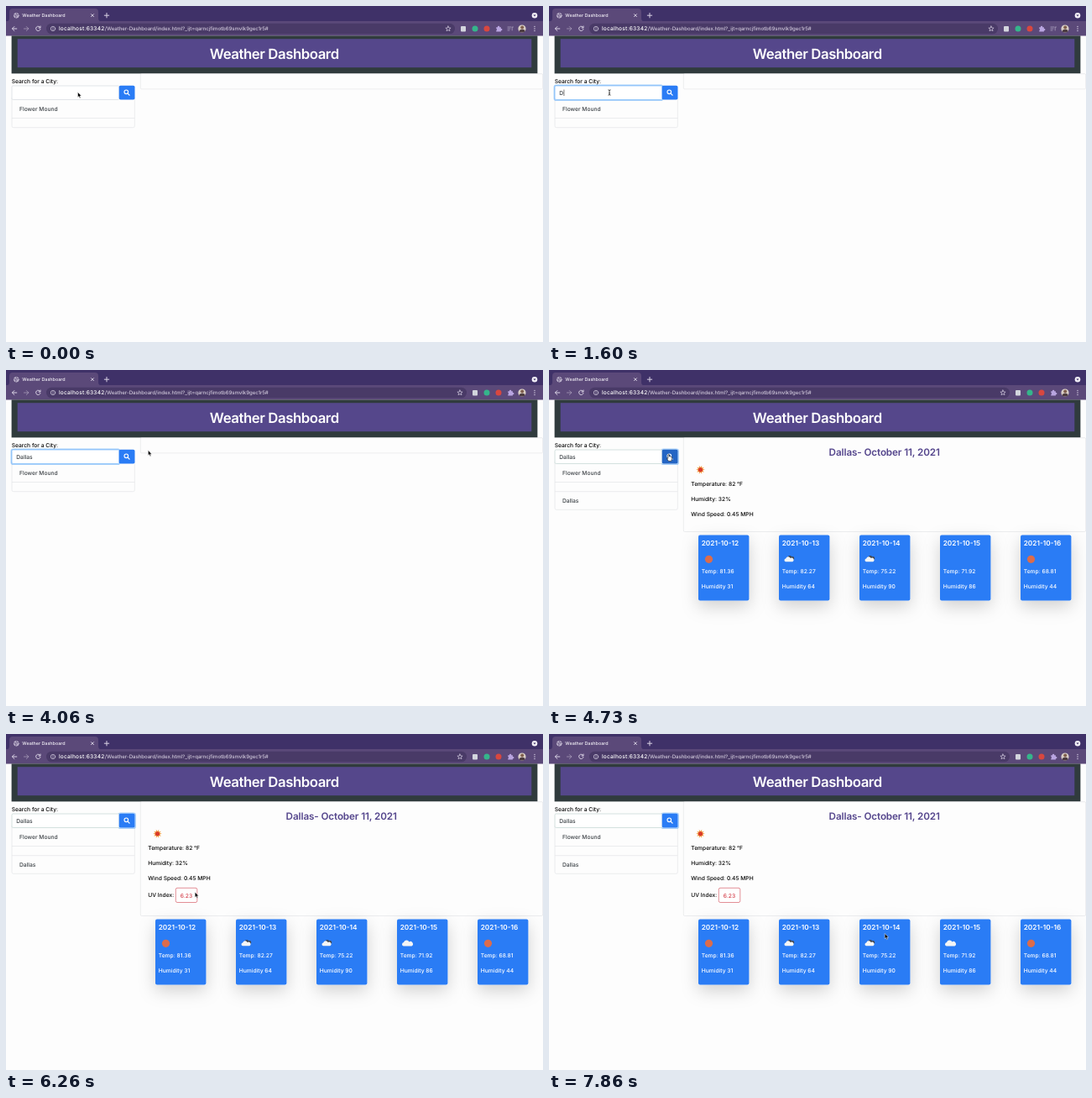
An HTML page for the animation above (8 s loop, 640x400 px).

```html
<!DOCTYPE html>
<html lang="en">
<head>
<meta charset="utf-8">
<title>Weather Dashboard</title>
<style>
  html, body { margin: 0; width: 100%; height: 100%; overflow: hidden; background: #fdfdfd; }
  svg { display: block; width: 100vw; height: 100vh; }
  text { font: 500 6.7px Inter, "Open Sans", sans-serif; fill: #212529; white-space: pre; text-rendering: geometricPrecision; }
  .tab { font-size: 5.4px; fill: #f4f1f8; }
  .host { font-size: 6.6px; letter-spacing: .2px; fill: #fff; }
  .path { font-size: 6.1px; letter-spacing: -.05px; fill: #cfc7da; }
  .title { font-size: 16.8px; font-weight: 600; letter-spacing: -.45px; fill: #fff; text-anchor: middle; }
  .city { font-size: 11.7px; font-weight: 600; letter-spacing: -.12px; fill: #54458c; text-anchor: middle; }
  .black { fill: #050505; }
  .item { fill: #3b4045; }
  .day { font-size: 8.25px; font-weight: 600; fill: #fff; }
  .stat { fill: #fff; }
  .uv { fill: #d43f4a; text-anchor: middle; }
  .edge { fill: none; stroke: #dfe1e4; stroke-width: .6; }
  .line { fill: none; stroke: #d9d2e4; stroke-width: 1; stroke-linecap: round; stroke-linejoin: round; }
  .thin { stroke-width: .7; }
</style>
</head>
<body>
<svg viewBox="0 0 640 400">
  <defs>
    <filter id="shadow" x="-70%" y="-50%" width="240%" height="220%">
      <feDropShadow dx="0" dy="7" stdDeviation="10" flood-color="#000" flood-opacity=".175"/>
    </filter>
    <clipPath id="round"><circle cx="615" cy="27" r="4.6"/></clipPath>
    <path id="cloud" d="M-4.8 3.2a2.3 2.3 0 0 1 .3-4.5a3.5 3.5 0 0 1 6.5-.6a2.7 2.7 0 0 1 3 5.1z"/>
  </defs>
  <rect width="640" height="400" fill="#fdfdfd"/>

  <!-- browser -->
  <rect width="640" height="19" fill="#3f3168"/>
  <path d="M0 18.5q4 0 4-4V7q0-4 4-4H106q4 0 4 4v7.500q0 4 4 4z" fill="#5b4979"/>
  <rect y="18" width="640" height="17.500" fill="#5b4979"/>
  <g class="line thin">
    <circle cx="12.300" cy="11.300" r="2.900" fill="#a99dbb"/>
    <path d="M9.600 10.500l2.500 1l-.5 2.500M12.500 8.600l.4 1.600l2.100 .5" stroke="#5b4979"/>
  </g>
  <text class="tab" x="19.300" y="13.200">Weather Dashboard</text>
  <path class="line" d="M101.500 9.700l3 3m0-3l-3 3M117.300 11.200h5.400M120 8.500v5.400"/>
  <circle cx="630" cy="11.200" r="3.300" fill="#f2eff7"/>
  <path d="M628.400 10.400h3.200l-1.600 2z" fill="#3f3168"/>
  <path class="line" d="M12.800 27H7.400m2.500-2.500L7.400 27l2.500 2.500"/>
  <path class="line" d="M21.400 27h5.400m-2.500-2.500l2.500 2.500l-2.500 2.500" opacity=".45"/>
  <path class="line" d="M40.700 25.500a2.700 2.700 0 1 0 .3 2M41 24v2h-2"/>
  <rect id="pill" x="48" y="20.700" height="12.600" rx="6.300" fill="#493a67"/>
  <circle class="line thin" cx="56" cy="27" r="2.700"/>
  <path class="line thin" d="M56 26.800v1.500M56 25.500v.05"/>
  <text class="host" x="63" y="29.200">localhost:63342</text>
  <text class="path" x="117.700" y="29.200">/Weather-Dashboard/index.html?_ijt=qarncjfimotb69smvlk9gec1r5#</text>
  <g id="tools">
    <path class="line thin" d="M527 24l.9 2l2.200 .2l-1.700 1.400l.6 2.100l-2-1.100l-2 1.100l.6-2.100l-1.700-1.400l2.200-.2z"/>
    <rect x="542" y="24" width="6" height="6.500" rx="1" fill="#d3d5dd"/>
    <circle cx="559" cy="27" r="3.500" fill="#35b58b"/>
    <circle cx="573" cy="27" r="3.500" fill="#d8473f"/>
    <path d="M584.300 25.200h1.700a1.150 1.150 0 1 1 2.200 0h1.700v1.800a1.150 1.150 0 1 1 0 2.200v1.300h-5.600v-1.500a1.100 1.100 0 0 0 0-2.100z" fill="#b9a5e0"/>
  </g>
  <path id="media" class="line" d="M598 25h4M598 27h3M598 29h2M603.200 29v-4h1.300" opacity=".5"/>
  <g clip-path="url(#round)">
    <rect x="610" y="22" width="10" height="10" fill="#d9cfc6"/>
    <circle cx="615.200" cy="25.600" r="2" fill="#80604e"/>
    <ellipse cx="615.200" cy="31" rx="3.600" ry="3.200" fill="#4b3b40"/>
  </g>
  <g fill="#d9d2e4"><circle cx="630" cy="24.500" r=".7"/><circle cx="630" cy="27" r=".7"/><circle cx="630" cy="29.500" r=".7"/></g>

  <!-- heading and search -->
  <rect x="6.600" y="35.400" width="626.800" height="45" fill="#303b3d"/>
  <rect x="13.700" y="39.200" width="612.600" height="34" fill="#55478b"/>
  <text class="title" x="319.800" y="62.600">Weather Dashboard</text>
  <text class="black" x="6.700" y="92">Search for a City:</text>
  <rect id="list" class="edge" x="7" y="108" width="146.300" rx="1.800"/>
  <path class="edge" d="M7 133.500h146.300"/>
  <text class="item" x="16" y="125.300">Flower Mound</text>
  <g id="added">
    <path class="edge" d="M7 144.700h146.300"/>
    <text class="item" x="16" y="158.200">Dallas</text>
  </g>
  <rect id="ring" y="94.300" height="18" rx="2.400" fill="none" stroke="#55a3f7" stroke-opacity=".5" stroke-width="1.500"/>
  <rect id="field" x="7" y="95" width="128" height="16.500" rx="1.500" fill="#fff" stroke-width=".6"/>
  <text id="typed" class="item" x="12.300" y="105.700"></text>
  <rect id="caret" y="99.500" width=".6" height="7.500" fill="#222"/>
  <rect id="button" x="134.700" y="94.800" width="18.800" height="16.800" rx="1.800"/>
  <circle cx="143.300" cy="102.300" r="2.300" fill="none" stroke="#fff" stroke-width="1.100"/>
  <path d="M145.100 104.100l2 2" stroke="#fff" stroke-width="1.300" stroke-linecap="round"/>

  <!-- results -->
  <rect id="panel" class="edge" x="160.300" y="80.700" width="479.400" rx="1.500"/>
  <g id="today">
    <text class="city" x="399.700" y="101.800">Dallas- October 11, 2021</text>
    <path id="rays" fill="#f2973a"/>
    <circle cx="180.500" cy="118.700" r="2.500" fill="#d8382a"/>
    <text class="black" x="169.300" y="138">Temperature: 82 °F</text>
    <text class="black" x="169.300" y="156">Humidity: 32%</text>
    <text class="black" x="169.300" y="173.700">Wind Speed: 0.45 MPH</text>
  </g>
  <g id="index">
    <text class="black" x="169.300" y="193.500">UV Index:</text>
    <rect x="202.300" y="183.300" width="25.500" height="17.200" rx="1.800" fill="#fff" stroke="#d8606a" stroke-width=".7"/>
    <text class="uv" x="215" y="194.500">6.23</text>
  </g>
  <g id="cards"></g>

  <!-- pointers -->
  <path id="arrow" d="M0 0v6.200l1.400-1.200l1 2.200l1.100-.5l-1-2.100h1.900z" fill="#000" stroke="#fff" stroke-width=".5"/>
  <path id="beam" d="M-1.500-3.200q1.500 0 1.500 1q0-1 1.500-1M0-2.500v5M-1.500 3.200q1.500 0 1.500-1q0 1 1.500 1M-.7 .8h1.400" fill="none" stroke="#222" stroke-width=".8"/>
  <path id="hand" d="M-1.600-3.300q.7-.7 1.300 0v2.200q.6-.5 1.200 .1q.7-.4 1.100 .2q.9-.2 1 .7v2q-.2 1.300-.9 2.500h-3.100q-1.200-1.400-2.100-3.300q.2-.9 1.500 .2z" fill="#fff" stroke="#111" stroke-width=".6" stroke-linejoin="round"/>
</svg>
<script>
  const LOOP = 8000, CITY = "Dallas";
  const FOCUS = 920, CLICK = 4450, LOADED = 4590, LATE_ICON = 4850, UV = 4990, MEDIA_END = 2920;
  const KEYS = [1450, 1850, 1990, 2120, 2250, 2450];
  const TRACK = [
    [0, 85.5, 102.5], [600, 72, 103], [2930, 72, 103], [3460, 116, 104],
    [4050, 169.500, 95.500], [4330, 143.500, 104], [5400, 143.500, 104],
    [6130, 225.200, 188.200], [6800, 225.200, 188.200], [7730, 400.200, 237.500]
  ];
  const DAYS = [
    [12, "sun", "81.36", 31], [13, "mixed", "82.27", 64], [14, "mixed", "75.22", 90],
    [15, "cloud", "71.92", 86], [16, "sun", "68.81", 44]
  ];
  const el = id => document.getElementById(id);
  const set = (id, attrs) => { for (const k in attrs) el(id).setAttribute(k, attrs[k]); };
  const show = (id, on) => set(id, { display: on ? "inline" : "none" });

  const cloud = (x, y, scale, fill) =>
    `<use href="#cloud" transform="translate(${x} ${y}) scale(${scale})" fill="${fill}"/>`;
  const icons = {
    sun: x => `<circle cx="${x + 12.5}" cy="225.300" r="4.600" fill="#dc6c4b"/>`,
    mixed: x => cloud(x + 13.700, 223.700, .7, "#3f4651") + cloud(x + 12, 225.500, .85, "#f5f5f5"),
    cloud: x => cloud(x + 12.5, 225.300, 1, "#f5f5f5")
  };

  el("cards").innerHTML = DAYS.map(([day, icon, temp, humidity], i) => {
    const x = 178 + 96 * i;
    return `<rect x="${x}" y="196.400" width="60.400" height="78.200" rx="2" fill="#2a7cf5" filter="url(#shadow)"/>
      <text class="day" x="${x + 3.700}" y="209">2021-10-${day}</text>
      <g id="icon${i}">${icons[icon](x)}</g>
      <text class="stat" x="${x + 3.800}" y="242">Temp: ${temp}</text>
      <text class="stat" x="${x + 3.800}" y="260">Humidity ${humidity}</text>`;
  }).join("");

  const star = Array.from({ length: 20 }, (_, i) => {
    const r = i % 2 ? 2.800 : 5.200, a = i * Math.PI / 10;
    return `${180.5 + r * Math.cos(a)} ${118.700 + r * Math.sin(a)}`;
  });
  set("rays", { d: `M${star.join("L")}z` });

  function pointerAt(t) {
    const i = TRACK.findIndex(p => p[0] > t);
    if (i < 0) return TRACK[TRACK.length - 1].slice(1);
    const [t0, x0, y0] = TRACK[i - 1], [t1, x1, y1] = TRACK[i];
    const u = (t - t0) / (t1 - t0), s = u * u * (3 - 2 * u);
    return [x0 + (x1 - x0) * s, y0 + (y1 - y0) * s];
  }

  function draw(t) {
    const typed = KEYS.filter(k => k <= t);
    const inField = t >= FOCUS && t < CLICK, clicked = t >= CLICK, loaded = t >= LOADED, uv = t >= UV;

    const media = t < MEDIA_END;
    set("pill", { width: media ? 487 : 501 });
    set("tools", { transform: `translate(${media ? 0 : 14} 0)` });
    show("media", media);

    el("typed").textContent = CITY.slice(0, typed.length);
    set("field", { stroke: inField ? "#62adf8" : clicked ? "#b9cfcc" : "#ced4da" });
    show("ring", inField || clicked);
    set("ring", clicked ? { x: 134, width: 20.200 } : { x: 6.300, width: 129.400 });
    const lastKey = typed.length ? typed[typed.length - 1] : FOCUS;
    show("caret", inField && (t - lastKey) % 1000 < 500);
    set("caret", { x: 12.800 + (typed.length ? el("typed").getComputedTextLength() : 0) });

    set("list", { height: loaded ? 58.300 : 36.700 });
    show("added", loaded);
    set("panel", { height: uv ? 135.800 : loaded ? 111.800 : 18.200 });
    show("today", loaded);
    show("index", uv);
    show("cards", loaded);
    set("cards", { transform: `translate(0 ${uv ? 24 : 0})` });
    show("icon3", t >= LATE_ICON);

    const [x, y] = pointerAt(t);
    const inRow = y > 95 && y < 111.500;
    const kind = inRow && x > 134.500 && x < 153.500 ? "hand"
      : inRow && x < 134.500 && t >= 400 ? "beam" : "arrow";
    for (const id of ["arrow", "beam", "hand"]) show(id, id === kind);
    set(kind, { transform: `translate(${x} ${y})` });
    set("button", { fill: kind === "hand" ? "#2465c4" : "#2a7cf5" });
  }

  const start = performance.now();
  function tick() {
    draw((performance.now() - start) % LOOP);
    requestAnimationFrame(tick);
  }
  tick();
</script>
</body>
</html>
```
